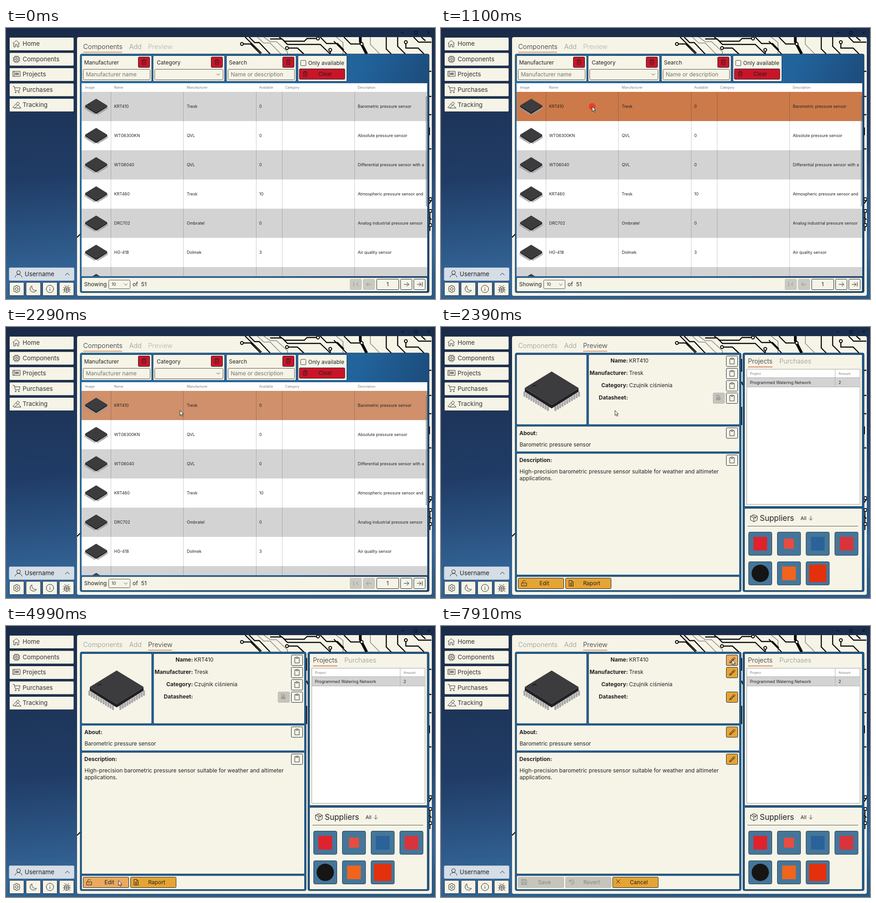
Write an HTML page that moves like this. It is 942x594 px and loops after 7990 ms.

```html
<!DOCTYPE html>
<html lang="en">
<head>
<meta charset="utf-8">
<title>Component browser</title>
<style>
html, body { margin: 0; width: 100%; height: 100%; overflow: hidden; background: #1b2d4b; }
svg { display: block; width: 942px; height: 594px; }
text { font-family: Inter, "Open Sans", sans-serif; white-space: pre; }
</style>
</head>
<body>
<svg id="stage" viewBox="0 0 942 594" xmlns="http://www.w3.org/2000/svg"></svg>
<script>
const LOOP = 7990;
const CREAM = '#f6f4e7', INK = '#222', EDGE = '#1b2a3c', RED = '#cb1428', AMBER = '#e6a433', HOT = '#ebaa5f';

// Drawing helpers
const rect = (x, y, w, h, fill, stroke = 'none', r = 0, more = '') =>
  `<rect x="${x}" y="${y}" width="${w}" height="${h}" rx="${r}" fill="${fill}" stroke="${stroke}" ${more}/>`;
const text = (x, y, size, str, fill = INK, more = '') =>
  `<text x="${x}" y="${y}" font-size="${size}" fill="${fill}" ${more}>${str}</text>`;
const line = (d, stroke = INK, width = 1, more = '') =>
  `<path d="${d}" fill="none" stroke="${stroke}" stroke-width="${width}" ${more}/>`;
const icon = (name, x, y, stroke = INK, k = 1) =>
  line(ICONS[name], stroke, 1 / k, `transform="translate(${x} ${y}) scale(${k})"`);
const group = (id, ...parts) => `<g id="${id}">${parts.join('')}</g>`;
const panel = (x, y, w, h) => rect(x, y, w, h, CREAM, '#12324f', 2);
const button = (x, y, w, h, fill = CREAM, stroke = EDGE) => rect(x + .5, y + .5, w - 1, h - 1, fill, stroke, 2);

const ICONS = {
  home: 'M0 7L7.5 .5L15 7M2 6V14.5H5.5V9H9.5V14.5H13V6',
  chip: 'M3 3H13V13H3ZM6 6H10V10H6ZM5 3V0M8 3V0M11 3V0M5 13V16M8 13V16M11 13V16M3 5H0M3 8H0M3 11H0M13 5H16M13 8H16M13 11H16',
  board: 'M0 1H16V12H0ZM3 1V12M6 4V9M9 4V9M12 4V9M5 5H13M5 8H13',
  cart: 'M0 .5H3L5.5 10H14L16 3.5H4M5 13.5a1.2 1.2 0 1 0 2.4 0a1.2 1.2 0 1 0-2.4 0M12 13.5a1.2 1.2 0 1 0 2.4 0a1.2 1.2 0 1 0-2.4 0',
  track: 'M0 13L11 1L15 4.5L4 14.5ZM3 14.5H18L12 8M7 5L10.5 9',
  user: 'M3.5 4.5a4 4 0 1 0 8 0a4 4 0 1 0-8 0M0 15C1 7 14 7 15 15',
  gear: 'M5 8a3 3 0 1 0 6 0a3 3 0 1 0-6 0M6.5 .5H9.5L10.3 2.6L13 1.9L14.6 4.4L13.5 6.5L15.5 8L13.5 9.8L14.6 12L13 14.2L10.3 13.4L9.5 15.5H6.5L5.7 13.4L3 14.2L1.4 12L2.5 9.8L.5 8L2.5 6.5L1.4 4.4L3 1.9L5.7 2.6Z',
  moon: 'M5 1C4 8 8 12 15 11C12 17 2 16 1 9C.6 5 2.5 2 5 1Z',
  info: 'M0 8a8 8 0 1 0 16 0a8 8 0 1 0-16 0M8 7V12M8 4V5.3',
  bug: 'M4 6H13V11C13 17 4 17 4 11ZM5 6C5 1 12 1 12 6M8.5 6V15M0 10H17M1 4L4 7M16 4L13 7M1 16L4 13M16 16L13 13M5 2L4 0M12 2L13 0',
  bin: 'M0 2.5H10M3 2.5V.5H7V2.5M1.3 2.5V11.5H8.7V2.5M3.8 5V9M6.2 5V9',
  clip: 'M3 1.5H0V13H10V1.5H7M3 0H7V3H3Z',
  pencil: 'M0 12L1 8.5L8.5 1Q10 -.5 11.5 1T11 3.5L3.5 11ZM7 2.5L9.5 5M1 8.5L3.5 11M3 9.5L9 3.5',
  lock: 'M0 5.5H11V12H0ZM2.5 5.5V3C2.5 -.5 8 -.5 8.5 2M5.5 8V9.5',
  page: 'M0 0H6L9.5 3.5V12.5H0ZM6 0V3.5H9.5M2 6H7.5M2 8.2H7.5M2 10.4H7.5',
  disk: 'M0 0H9L11 2V11H0ZM2.5 0V3.5H8V0M2.5 11V6.5H8.5V11',
  undo: 'M1 1V4.5H4.5M1.2 4C3 0 9 -.5 11 4S8 12 4.5 10.5M6 3V6.5L8.5 8',
  cross: 'M0 0L9 9M9 0L0 9',
  cube: 'M8 0L15.5 3.8V12L8 16L.5 12V3.8ZM.5 3.8L8 7.8L15.5 3.8M8 7.8V16M4 2L11.8 6V9',
  down: 'M0 0L3.5 3.5L7 0',
  right: 'M0 5H11M6.5 .5L11 5L6.5 9.5',
  left: 'M11 5H0M4.5 .5L0 5L4.5 9.5',
  last: 'M0 5H9M4.5 .5L9 5L4.5 9.5M11.5 0V10',
  first: 'M11.5 .5L7 5L11.5 9.5M1 0V10M7 5H9'
};

// Isometric chip with legs along the two front edges
function chip(x, y, k) {
  let legs = '';
  for (let i = 0; i < 11; i++) {
    const f = (i + .6) / 11.4, px = 59 * (1 - f), py = 6 + 36 * f;
    for (const s of [-1, 1]) legs += `M${s * px} ${py}l${s * 4} 2v9`;
  }
  return `<g transform="translate(${x} ${y}) scale(${k})">` +
    line(legs, '#77777b', 3.6) + line(legs, '#c4c4c8', 1.6) +
    '<path d="M-59 0L0 36L59 0V8L0 45L-59 8Z" fill="#202022"/>' +
    '<path d="M0 -36L59 0L0 37L-59 0Z" fill="#3c3c3e"/>' +
    line('M-59 1L0 37.5L59 1', '#565659', 1) +
    line('M-42 -3q4 -5 9 -1', '#111', 1.4) + '</g>';
}

// Window frame, circuit artwork and sidebar
function frame() {
  const node = (x, y) => `<circle cx="${x}" cy="${y}" r="3.2" fill="${CREAM}" stroke="#0b0b0b" stroke-width="2"/>`;
  const art = line('M552 20L566 33H580L604 57M566 20L580 30H594L618 52V57M725 20L740 32V57M800 20V36L820 56', '#8d8d86', 1.6) +
    line('M521 35H537L559 57M525 20L561 55M534 20L546 32H556L580 57M580 24H606L618 36H690L712 57M621 44H640L654 57' +
      'M600 20L612 29H655L661 23H682M690 20L704 34H728L742 48M712 50V57M777 35H757L742 20M748 57L720 29M835 20V46L846 57' +
      'M878 35V44H905L918 57M860 20V40L877 57M895 20L906 31H934M912 20L921 28M929 150H934M929 190H934M929 95H934M929 265H934' +
      'M929 385L934 378M929 415L934 420M156 459L163 452M660 70V98M660 120L663 128M660 175V215', '#0b0b0b', 2.4) +
    line('M778 20V30L792 57', '#0b0b0b', 6) + line('M930 218V235M931 402V445', '#0b0b0b', 2) +
    [[518, 35], [617, 44], [685, 23], [712, 48], [781, 35], [878, 31], [932, 375], [932, 401], [932, 432]].map(p => node(...p)).join('');
  const nav = [['Home', 'home'], ['Components', 'chip'], ['Projects', 'board'], ['Purchases', 'cart'], ['Tracking', 'track']]
    .map(([label, ic], i) => {
      const y = 20 + i * 33.5;
      return button(7, y, 142.5, 30) + icon(ic, 15, y + 7, '#333') + text(36.5, y + 19, 13.4, label, '#333');
    });
  const tools = ['gear', 'moon', 'info', 'bug'].map((ic, i) => {
    const x = 7 + i * 36.5;
    return button(x, 557, 33, 30) + icon(ic, x + 8.5, 564, '#222');
  });
  return rect(0, 0, 942, 594, 'url(#sky)') + rect(0, 0, 942, 20, '#1b2d4b', 'none', 0, 'opacity=".7"') +
    line('M868 10.5H874M897 7.5H903V13.5H897ZM925 7L931 13M931 7L925 13', '#05080d') +
    rect(156, 20, 779, 567, CREAM, 'none', 4) + `<g clip-path="url(#sheet)">${art}</g>` +
    nav.join('') + rect(7, 525.5, 142.5, 28, '#d5dde6', '#b9c5d2', 2) + icon('user', 20, 531.5) +
    text(41, 543.5, 13.4, 'Username') + line('M130 542L134.7 537L139.4 542') + tools.join('');
}

function tabs(active) {
  const list = [['Components', 169.5, 85.5], ['Add', 270.5, 26.5], ['Preview', 312, 53]];
  return list.map(([s, x, w], i) =>
    text(x, 45.8, 14.5, s, i === active ? '#2c2c2c' : i === 2 ? '#b4b2aa' : '#96958f', 'font-weight="300"') +
    (i === active ? line(`M${x} 53H${x + w}`, '#cf7a4c', 1.3) : '')).join('');
}

const PARTS = [
  ['KRT410', 'Tresk', 0, 'Barometric pressure sensor'],
  ['WTG6300KN', 'QVL', 0, 'Absolute pressure sensor'],
  ['WTG6040', 'QVL', 0, 'Differential pressure sensor with a'],
  ['KRT460', 'Tresk', 10, 'Atmospheric pressure sensor and'],
  ['DRC702', 'Ombratel', 0, 'Analog industrial pressure sensor'],
  ['HG-418', 'Dolmek', 3, 'Air quality sensor'],
  ['', '', '', '']
];

function listPage() {
  const filters = [[166, 154, 'Manufacturer', 'Manufacturer name'], [323, 157, 'Category', ''], [484, 153, 'Search', 'Name or description']]
    .map(([x, w, label, hint]) => panel(x, 60.5, w, 56.5) + text(x + (w > 155 ? 8 : 5.5), 79.7, 12, label) +
      button(x + w - 30, 63, 26, 24, RED) + icon('bin', x + w - 22, 68.5) +
      rect(x + 3.5, 90.5, w - 7, 23, CREAM, '#555', 2) + text(x + 9.5, 106, 12, hint, '#77766f')).join('');
  const rows = PARTS.map((p, i) => rect(166, 140 + 64 * i, 759, 64, i % 2 ? '#fff' : '#d3d3d3')).join('');
  const cells = PARTS.map(([name, maker, stock, about], i) => {
    const y = 175.3 + 64 * i;
    return chip(198, y - 5.5, .41) + text(237.5, y, 9, name) + text(397, y, 9, maker) +
      text(556, y, 9, stock) + text(772.5, y, 9, about);
  }).join('');
  const heads = [['Image', 173.5], ['Name', 237.5], ['Manufacturer', 397], ['Available', 556], ['Category', 613], ['Description', 772.5]]
    .map(([s, x]) => text(x, 132.8, 7.2, s, '#777')).join('');
  const pager = [[755, 'first', 1], [784, 'left', 1], [866, 'right', 0], [895, 'last', 0]]
    .map(([x, ic, off]) => button(x, 550, 26, 24, off ? '#cbcac2' : CREAM, off ? '#c2c1b9' : EDGE) +
      icon(ic, x + 7.5, 557, off ? '#8e8e88' : INK)).join('');
  return group('list', tabs(0), rect(163, 57, 766, 523, 'url(#blue)', '#142e4a', 3), filters,
    line(ICONS.down, '#444', 1, 'transform="translate(462.5 100)"'),
    panel(641, 60.5, 107.5, 56.5), rect(647, 71, 11.5, 11.5, CREAM, '#444', 1.5), text(663.5, 80.8, 12, 'Only available'),
    button(643.5, 89, 101, 24, RED), icon('bin', 652, 94.5), text(686, 104.5, 12, 'Clear'),
    rect(450.5, 63.5, 25, 23, '#fff', 'none', 2, 'id="binHot" opacity="0"'),
    `<g clip-path="url(#grid)">${rect(166, 121, 759, 19, '#fff')}${rows}`,
    rect(166, 140, 759, 64, '#000', 'none', 0, 'id="rowHot"'), rect(166, 140, 759, 64, '#cf906b', 'none', 0, 'id="rowSel"'),
    line('M230.5 140V544M389.5 140V544M549.5 140V544M606.5 140V544M765.5 140V544', '#000', 1, 'opacity=".2"'),
    heads, cells, '</g>', line('M923 150V391', '#777', 1.6),
    panel(166, 547, 759, 30.5), text(171.5, 566, 12.2, 'Showing'), rect(225.5, 552.5, 47, 19, CREAM, '#555', 2),
    text(232, 565.4, 9, '10'), icon('down', 259.5, 560.5, '#555'), text(278, 566, 12.2, 'of  51'),
    pager, button(813.5, 550, 49.5, 24), text(838, 566, 12, '1', INK, 'text-anchor="middle"'));
}

const SLOTS = [75, 102, 129, 156, 232.5, 292];
const action = (x, label, ic, fill = AMBER, ink = INK) =>
  button(x, 550, 101, 24, fill, ink === INK ? EDGE : '#b9b8b0') + icon(ic, x + 8, 555.5, ink) +
  text(x + 58, 565.7, 12, label, ink, 'text-anchor="middle"');

function previewPage() {
  const fields = [['Name:', 'KRT410'], ['Manufacturer:', 'Tresk'], ['Category:', 'Czujnik ciśnienia'], ['Datasheet:', '']]
    .map(([k, v], i) => text(410.5, 77.8 + 27 * i, 12, k, INK, 'text-anchor="end" font-weight="700"') +
      text(413, 77.8 + 27 * i, 12, v)).join('');
  const marks = ['#e0222c', '#e84c40', '#2a6299', '#d9343c', '#151515', '#f0641e', '#e4300c'].map((c, i) => {
    const x = 675 + i % 4 * 63.1, y = i < 4 ? 449 : 514, s = i === 6 ? 38 : i === 1 ? 22 : 30;
    return rect(x + .5, y + .5, 51, 51, '#457699', '#1c3a58', 3) +
      (i === 4 ? `<circle cx="${x + 26}" cy="${y + 26}" r="19" fill="${c}"/>` : rect(x + 26 - s / 2, y + 26 - s / 2, s, s, c));
  }).join('');
  const copy = SLOTS.map(y => button(626, y - 12, 26, 24) + icon('clip', 634, y - 7, '#333')).join('');
  const edit = SLOTS.filter((y, i) => i !== 2).map(y => button(626, y - 12, 26, 24, AMBER)).join('');
  const pens = SLOTS.filter((y, i) => i !== 2).map(y => icon('pencil', 633.5, y - 6)).join('');
  return group('preview', tabs(2),
    rect(163, 57, 496, 523, '#1f659f', '#142e4a', 3), rect(663, 57, 266, 523, '#1f5b91', '#142e4a', 3),
    panel(166, 60.5, 154, 153.5), panel(324, 60.5, 331.5, 153.5), panel(166, 217.5, 489.5, 56), panel(166, 277, 489.5, 266.5),
    panel(166, 547, 489.5, 30.5), chip(243, 133.5, 1), fields,
    text(172, 236.6, 12, 'About:', INK, 'font-weight="700"'), text(172.5, 261.6, 12, 'Barometric pressure sensor'),
    text(172, 296, 12, 'Description:', INK, 'font-weight="700"'),
    text(172.5, 321, 12, 'High-precision barometric pressure sensor suitable for weather and altimeter'),
    text(172.5, 336, 12, 'applications.'),
    panel(666.5, 60.5, 258.5, 333), panel(666.5, 397.5, 258.5, 180),
    text(674, 80, 14.4, 'Projects', '#2c2c2c', 'font-weight="300"'), text(743, 80, 14.4, 'Purchases', '#96958f', 'font-weight="300"'),
    line('M674 87.5H728', '#cf6a3c', 1.4), rect(671.5, 92.5, 248.5, 296, '#fff', '#a6a6a0'),
    rect(672, 111, 247.5, 21, '#d3d3d3'), line('M865.5 93V132M672 111H920M672 131.5H920', '#b0b0b0'),
    text(678.5, 104.8, 7.2, 'Project', '#777'), text(873, 104.8, 7.2, 'Amount', '#777'),
    text(678.5, 124.8, 9, 'Programmed Watering Network'), text(873, 124.8, 9, '2'),
    icon('cube', 679, 411), text(700, 424.8, 17, 'Suppliers'), text(789.5, 422.8, 11, 'All'),
    line('M812 414V423.5M808 419.5L812 423.5L816 419.5', '#444'), line('M673 436.5H916', '#555'), marks,
    group('view', copy, button(597, 144, 26, 24, '#c6c5bd', '#b9b8b0'), icon('page', 605, 149.5, '#8e8d86', .75),
      text(609.7, 160.5, 6, 'PDF', '#8e8d86', 'text-anchor="middle"'), action(169, 'Edit', 'lock'),
      `<g id="editHot">${action(169, 'Edit', 'lock', HOT)}</g>`, action(273, 'Raport', 'page')),
    group('edit', edit, button(626, 63, 26, 24, HOT).replace('/>', ' id="penHot"/>'), pens,
      action(169, 'Save', 'disk', '#c6c5bd', '#85847e'), action(273, 'Revert', 'undo', '#c6c5bd', '#85847e'),
      action(376.5, 'Cancel', 'cross')));
}

const stage = document.getElementById('stage');
stage.innerHTML = `<defs>
  <linearGradient id="sky" x1=".35" y1="0" x2=".5" y2="1"><stop offset="0" stop-color="#1b2d4b"/>
    <stop offset=".5" stop-color="#203c66"/><stop offset=".88" stop-color="#34679a"/><stop offset="1" stop-color="#2b5a86"/></linearGradient>
  <linearGradient id="blue" x1="0" y1="0" x2="1" y2=".3"><stop offset="0" stop-color="#2270ac"/>
    <stop offset=".75" stop-color="#22639c"/><stop offset="1" stop-color="#1a4673"/></linearGradient>
  <clipPath id="sheet"><rect x="156" y="20" width="779" height="567"/></clipPath>
  <clipPath id="grid"><rect x="166" y="121" width="759" height="423"/></clipPath></defs>` +
  frame() + listPage() + previewPage() +
  '<circle id="click" r="7.5" fill="#ec3a24" opacity="0"/>' +
  '<path id="cursor" d="M0 0V11L2.6 8.6L4.4 12.6L6.2 11.8L4.4 7.9H7.6Z" fill="#fff" stroke="#111" stroke-width=".9"/>';

// Plays a table of [time, value] as held steps
function play(id, prop, table) {
  const keys = table.map(([t, v]) => ({ offset: t / LOOP, [prop]: v, easing: 'steps(1, end)' }));
  keys.push({ offset: 1, [prop]: table[table.length - 1][1] });
  document.getElementById(id).animate(keys, { duration: LOOP, iterations: Infinity });
}
const move = (x, y) => `translate(${x}px, ${y}px)`;
const rowAt = (t, i) => [t, move(0, 64 * i)];

// Pointer way points: time, x, y
const WAY = [[100, 567, 566], [300, 520, 330], [400, 470, 185], [500, 466, 80], [600, 370, 140], [700, 332, 172],
  [1500, 332, 172], [1600, 470, 194], [1700, 382, 183], [2800, 382, 183], [2900, 379, 150], [3100, 335, 44], [3200, 311, 72],
  [3400, 338, 124], [3500, 338, 124], [3700, 400, 150], [4000, 590, 238], [4300, 525, 167], [4800, 344, 540], [5000, 247, 558],
  [6400, 247, 558], [6500, 262, 545], [6800, 480, 290], [7000, 628, 96], [7200, 648, 134], [7400, 644, 104],
  [7500, 641, 82], [7700, 640, 74], [7800, 640, 74], [7900, 639, 74]];
function pointer(t) {
  const i = Math.max(1, WAY.findIndex(w => w[0] >= t));
  const [a, b] = [WAY[i - 1], WAY[i]], f = Math.max(0, (t - a[0]) / (b[0] - a[0]));
  return move(a[1] + (b[1] - a[1]) * f, a[2] + (b[2] - a[2]) * f);
}
const path = [[0, pointer(100)]];
for (let t = 100; t <= 7900; t += 100) path.push([t - (t > 1100 ? 10 : 0), pointer(t)]);
play('cursor', 'transform', path);
play('cursor', 'opacity', [[0, 0], [100, 1]]);

play('click', 'transform', [[0, move(332, 172)], [2000, move(382, 183)], [5000, move(247, 558)]]);
play('click', 'opacity', [[0, 0], [1000, .9], [1190, .4], [1290, 0], [2100, .9], [2190, .4], [2290, 0], [6080, .9], [6190, .4], [6290, 0]]);

play('rowHot', 'transform', [rowAt(0, 5), rowAt(300, 2), rowAt(400, 0)]);
play('rowHot', 'opacity', [[0, 0], [200, .1], [500, 0], [700, .1]]);
play('rowSel', 'opacity', [[0, 0], [1000, 1]]);
play('rowSel', 'fill', [[0, '#cc7a4a'], [1290, '#cf906b'], [2100, '#cc7a4a'], [2290, '#cf906b']]);
play('binHot', 'opacity', [[0, 0], [500, .2], [600, 0]]);

play('list', 'opacity', [[0, 1], [2390, 0]]);
play('preview', 'opacity', [[0, 0], [2390, 1]]);
play('editHot', 'opacity', [[0, 0], [4990, 1]]);
play('view', 'opacity', [[0, 1], [6190, 0]]);
play('edit', 'opacity', [[0, 0], [6190, 1]]);
play('penHot', 'transform', [[0, move(0, 27)], [7490, move(0, 0)]]);
play('penHot', 'opacity', [[0, 0], [6990, 1], [7090, 0], [7390, 1]]);
</script>
</body>
</html>
```
